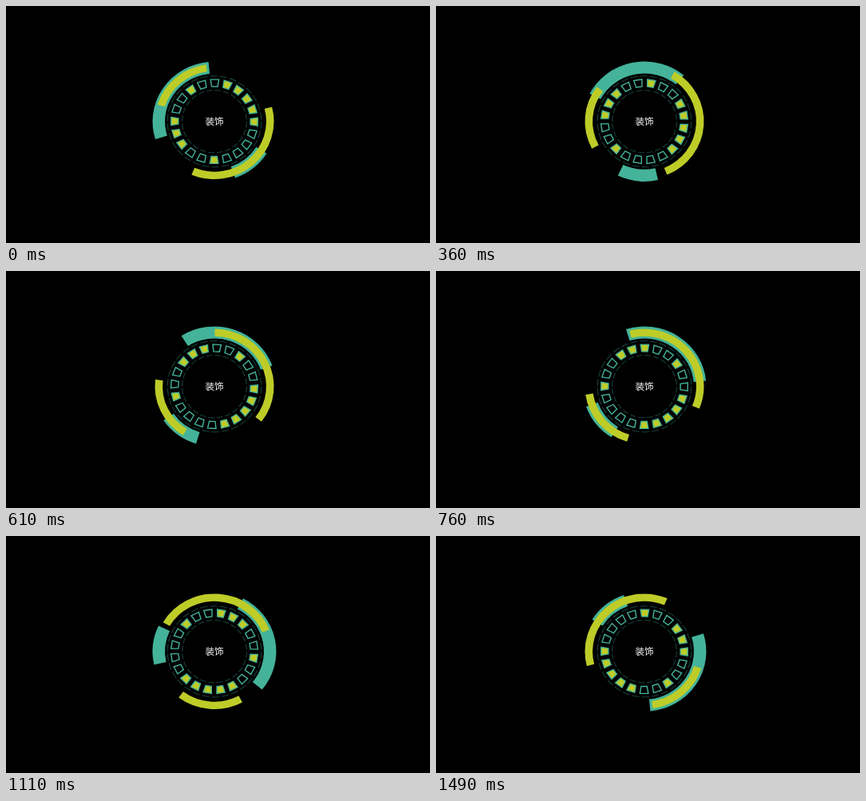
These frames come from a looping animation (531 px wide and 297 px high, 1610 ms). An HTML page:

```html
<!DOCTYPE html>
<html lang="zh">
<head>
<meta charset="utf-8">
<title>装饰</title>
<style>
html, body { margin: 0; width: 100%; height: 100%; overflow: hidden; background: #000; }
svg { display: block; width: 531px; height: 297px; }
text { font: 500 11.6px "Noto Sans CJK SC", "Noto Sans CJK", sans-serif; fill: #fff; text-anchor: middle; }
</style>
</head>
<body>
<svg viewBox="0 0 531 297">
  <g id="dial" transform="translate(261 144.7) scale(1 .97)" fill="none">
    <g stroke="#17423a" stroke-width="1.1">
      <circle r="58.8" stroke-dasharray="9.3 3.02"/>
      <circle r="40.4" stroke-dasharray="7.6 2.98"/>
    </g>
    <g id="tiles" stroke="#44b39a" stroke-width="1.4"></g>
    <g id="teal" stroke="#44b39a" stroke-width="15.5"></g>
    <g id="lime" stroke="#becc28" stroke-width="9.6"></g>
  </g>
  <text x="261" y="149.3">装饰</text>
</svg>
<script>
const STARTS = [0, 110, 240, 360, 490, 610, 760, 860, 990, 1110, 1240, 1360, 1490];
const LOOP = 1610, STEP = 15, RADIUS = 69.7;
const FILLED = "01111100001001110010";
const $ = id => document.getElementById(id);

function addPath(parent, d, fill) {
  const p = document.createElementNS("http://www.w3.org/2000/svg", "path");
  p.setAttribute("d", d);
  if (fill) p.setAttribute("fill", fill);
  parent.appendChild(p);
  return p;
}

function point(deg) {
  const a = deg * Math.PI / 180;
  return (RADIUS * Math.cos(a)).toFixed(3) + " " + (RADIUS * Math.sin(a)).toFixed(3);
}

function addArc(parent, from, to) {
  addPath(parent, `M${point(from)}A${RADIUS} ${RADIUS} 0 0 1 ${point(to)}`);
}

addArc($("teal"), 162.7, 264.5);
addArc($("teal"), 32.3, 70.4);
addArc($("lime"), 345.4, 472.6);
addArc($("lime"), 197, 261.9);

[...FILLED].forEach((on, i) => {
  const tile = addPath($("tiles"), "M-5.2-54.2H5.2L3.7-45.1H-3.7Z", on === "1" ? "#becc28" : "none");
  tile.setAttribute("transform", `rotate(${i * 18 + 0.4})`);
});

function turn(id, deg) {
  $(id).setAttribute("transform", `rotate(${deg})`);
}

function render(ms) {
  const t = ms % LOOP;
  const angle = STEP * (STARTS.filter(s => s <= t).length - 1);
  turn("tiles", angle);
  turn("teal", angle);
  turn("lime", -angle);
}

const begin = performance.now();
function tick() {
  render(performance.now() - begin);
  requestAnimationFrame(tick);
}
tick();
</script>
</body>
</html>
```
